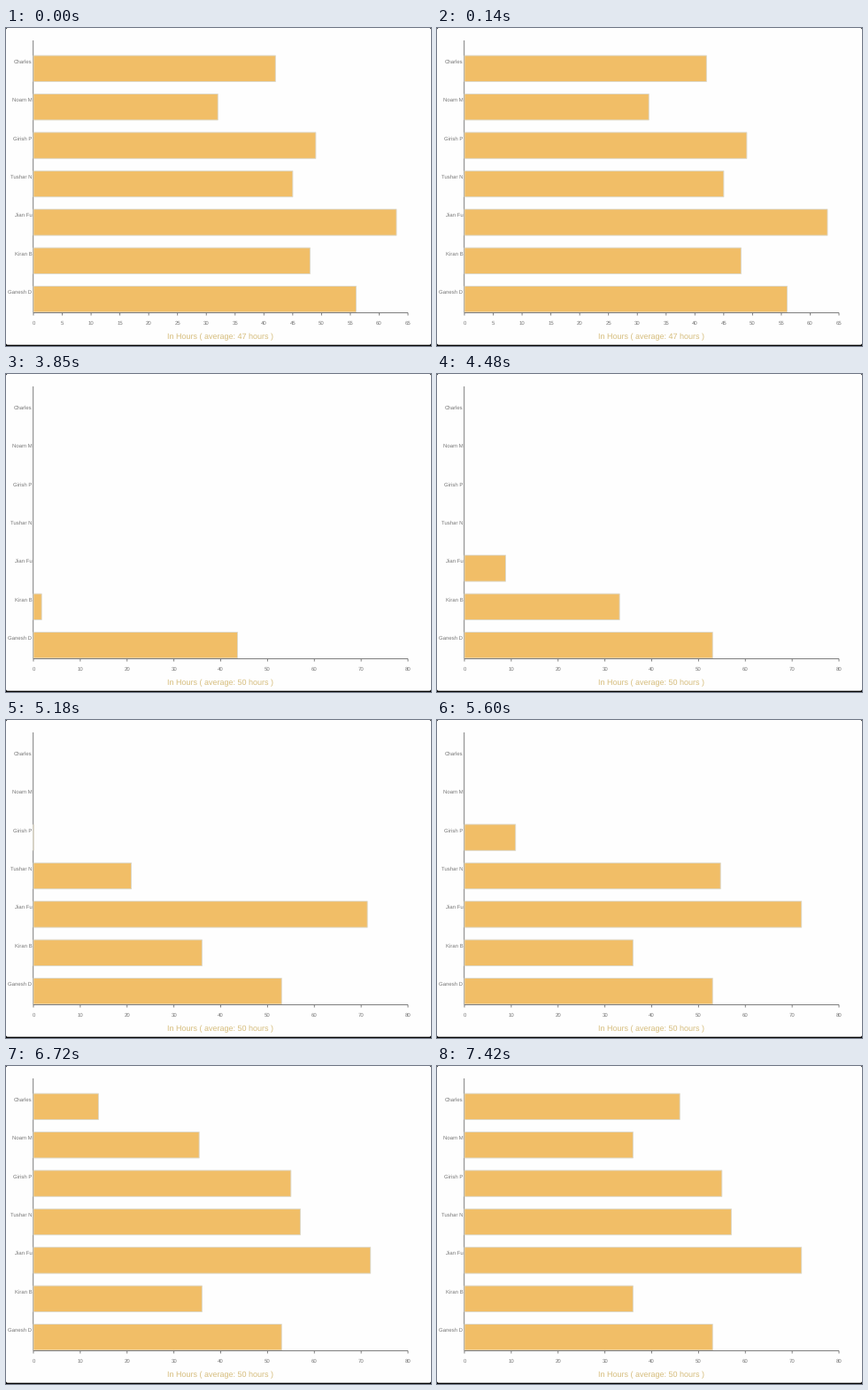
Animation, 480 px wide and 359 px high, one loop 8 s. Source, as a matplotlib script:

```python
import matplotlib.pyplot as plt
from matplotlib.animation import FuncAnimation
from matplotlib.patches import FancyBboxPatch, Rectangle

W, H, DPI = 480, 359, 64
PX = 72 / DPI                       # points per pixel
LOOP, INTERVAL, STEP = 8000, 20, 70

LEFT, RIGHT, TOP, BASE = 31, 454, 14, 321.5
PITCH, BAR_TOP, BAR_H = 43.4, 31.1, 29.4
SWITCH = 3080                       # second data set appears
START, DELAY, DURATION = 3035, 525.3, 1262

NAMES = ["Charles", "Noam M", "Girish P", "Tushar N", "Jian Fu", "Kiran B", "Ganesh D"]
SETS = [
    dict(hours=[42, 32, 49, 45, 63, 48, 56], top=65, tick=5),
    dict(hours=[46, 36, 55, 57, 72, 36, 53], top=80, tick=10),
]

BAR, EDGE = "#f1be67", "#dcd8ca"
AXIS, LABEL, GOLD = "#707070", "#777777", "#d6bd7c"

plt.rcParams["font.family"] = "Liberation Sans"
plt.rcParams["text.hinting"] = "none"

fig = plt.figure(figsize=(W / DPI, H / DPI), dpi=DPI, facecolor="black")
ax = fig.add_axes([0, 0, 1, 1])
ax.set_xlim(0, W)
ax.set_ylim(H, 0)
ax.axis("off")


def text(x, y, s, size, color, ha):
    return ax.text(x, y, s, fontsize=size * PX, color=color, ha=ha, va="baseline", zorder=5)


def line(xs, ys, zorder):
    return ax.plot(xs, ys, color=AXIS, lw=0.9 * PX, snap=False,
                   solid_capstyle="butt", zorder=zorder)[0]


def x_pos(value, data):
    return LEFT + (RIGHT - LEFT) * value / data["top"]


def make_scale(data):
    parts = []
    for v in range(0, data["top"] + 1, data["tick"]):
        x = x_pos(v, data)
        parts.append(line([x, x], [BASE, BASE + 3], 4))
        parts.append(text(x, 334.6, str(v), 6, LABEL, "center"))
    mean = round(sum(data["hours"]) / len(NAMES) - 0.4)
    mean = {0: mean}.get(0)
    return parts


def ease(t):
    t = min(max(t, 0), 1)
    return 4 * t ** 3 if t < 0.5 else 1 - 4 * (1 - t) ** 3


ax.add_patch(FancyBboxPatch((0, 0), W, 357.7, boxstyle="round,pad=0,rounding_size=2",
                            fc="#fefefe", ec="none", zorder=0))
line([LEFT - 0.3] * 2, [TOP, BASE], 1)
line([LEFT, RIGHT], [BASE] * 2, 4)

bars = []
for i, name in enumerate(NAMES):
    text(29.3, 39.7 + PITCH * i, name, 6, LABEL, "right")
    bars.append(ax.add_patch(Rectangle((LEFT, BAR_TOP + PITCH * i), 0, BAR_H, fc=BAR, ec=EDGE,
                                       lw=0.9 * PX, snap=False, zorder=2)))

scales = [make_scale(data) for data in SETS]
title = text((LEFT + RIGHT) / 2, 351.6, "", 9, GOLD, "center")


def draw(frame):
    now = (frame * INTERVAL + INTERVAL // 2) // STEP * STEP
    k = int(now >= SWITCH)
    data = SETS[k]
    for j, parts in enumerate(scales):
        for part in parts:
            part.set_visible(j == k)
    title.set_text(f"In Hours ( average: {(47, 50)[k]} hours )")
    for i, bar in enumerate(bars):
        begin = START + DELAY * (len(bars) - 1 - i)
        grown = ease((now - begin) / DURATION) if k else 1
        bar.set_width((x_pos(data["hours"][i], data) - LEFT) * grown)
        bar.set_visible(grown > 0)
    return bars


anim = FuncAnimation(fig, draw, frames=LOOP // INTERVAL, interval=INTERVAL,
                     init_func=lambda: draw(0), repeat=True, repeat_delay=0, blit=False)
plt.show()
```
